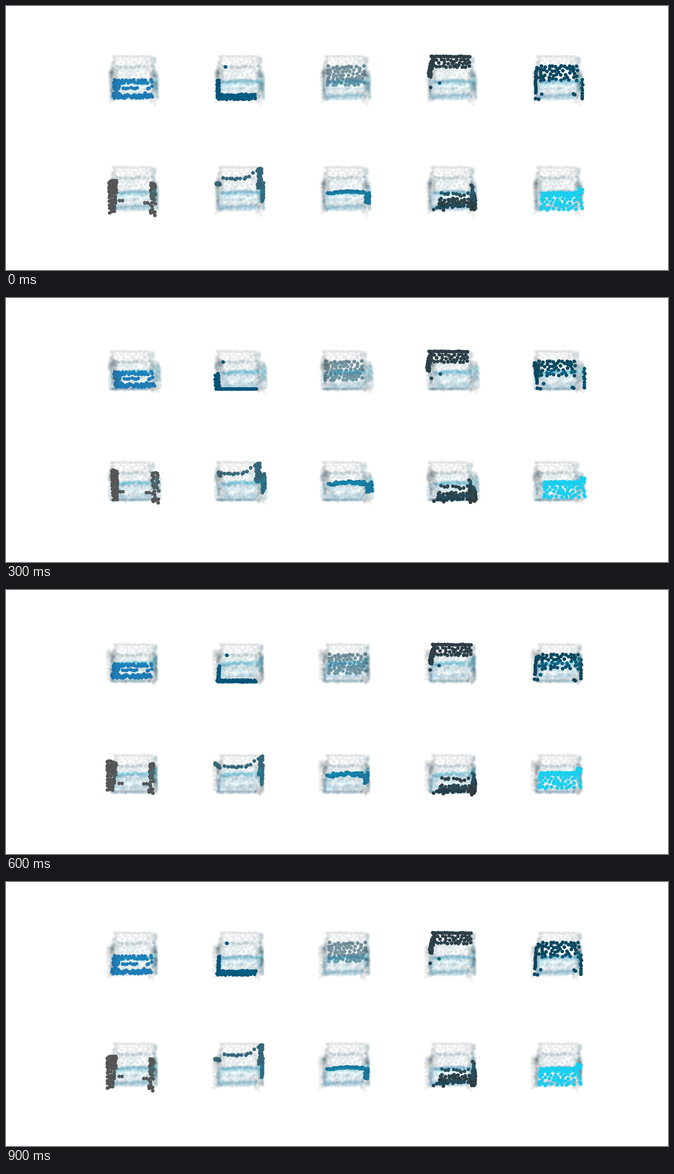
Write a matplotlib script that moves like this. It is 1183 px wide and 473 px high and loops after 1000 ms.

```python
import numpy as np
import matplotlib.pyplot as plt
from matplotlib.animation import FuncAnimation
from matplotlib.colors import to_rgba

W, H = 1183, 473
STEPS = 10
COL_GAP, ROW_GAP = 189.6, 198.7
FAINT = 0.052
BACK = -4.1  # sway of the backrest; positive values lie nearer the viewer

rng = np.random.default_rng(7)


def underside(x, y):
    """Bottom plane, seen edge-on when the camera is low."""
    return (y - 163) / 1.31


def ramp(top, bottom, side=0.0):
    """Depth rule running over a region from top to bottom and left to right."""
    def rule(x, y):
        v = (y - y.min()) / max(np.ptp(y), 1)
        u = (x - x.min()) / max(np.ptp(x), 1)
        return top + (bottom - top) * v + side * (u - 0.5)
    return rule


def with_depth(x, y, depth):
    d = depth(x, y) if callable(depth) else np.full(len(x), float(depth))
    return np.column_stack([x, y, d])


def spread(n, x0, x1, y0, y1, depth, lean=0.0):
    """Evenly scattered points in a box that may lean sideways."""
    lo, size = np.array([x0, y0]), np.array([x1 - x0, y1 - y0])
    pts = [lo + rng.random(2) * size]
    while len(pts) < n:
        cand = lo + rng.random((14, 2)) * size
        gap = np.linalg.norm(cand[:, None] - np.array(pts)[None], axis=2).min(axis=1)
        pts.append(cand[gap.argmax()])
    x, y = np.array(pts).T
    return with_depth(x + lean * (y - y0), y, depth)


def arc(n, start, end, depth, sag=0.0, wobble=0.0):
    """Points along a sagging line."""
    s = np.linspace(0, 1, n)[:, None]
    x, y = (np.array(start) * (1 - s) + np.array(end) * s).T
    x, y = rng.uniform(-wobble, wobble, (2, n)) + [x, y]
    return with_depth(x, y + 4 * sag * (s * (1 - s))[:, 0], depth)


def cushion():
    return [
        spread(27, 192, 262, 132, 139, ramp(0, 1)),
        spread(12, 192, 203, 141, 158, ramp(1, 3.5)),
        arc(7, (211, 146), (236, 147), 2, sag=1, wobble=2),
        arc(5, (259, 142), (248, 157), ramp(1, 3.5), wobble=3),
        spread(36, 191, 262, 159, 165, 4),
    ]


def base():
    return [
        arc(1, (202.5, 109), (202.5, 109), -4.4),
        spread(18, 187.5, 191.5, 133, 160, ramp(-3, -1, 3)),
        spread(54, 188, 256, 158, 167.5, underside),
    ]


def back_lower():
    return [spread(72, 195, 262, 107, 142, BACK)]


def back_top():
    return [
        arc(21, (191, 90.5), (260, 90.5), BACK, wobble=0.7),
        spread(32, 195, 260, 95, 110, BACK),
        spread(22, 191, 196, 93, 127, ramp(BACK, -3), lean=-0.17),
        arc(2, (190, 146), (206, 138), 1.5),
    ]


def back_rear():
    return [
        spread(54, 189, 263, 107, 134, BACK - 0.3),
        arc(13, (188, 118), (188, 155), ramp(-1.5, 2.5), wobble=0.8),
        arc(3, (188, 166), (199, 158), 3.4, sag=5),
        arc(8, (271, 133), (272, 165), 4, wobble=1.2),
        arc(2, (255.5, 157.5), (258, 159), -1.9),
    ]


def arms():
    return [
        spread(32, 184, 198, 113, 137, ramp(3, 3.8, -4)),
        spread(22, 184, 196, 139, 172, ramp(4, 6, -2)),
        arc(2, (203, 150), (208, 150), 1.2),
        spread(26, 258, 267, 118, 172, ramp(3.6, 5.8, 2.5)),
        arc(2, (248, 154), (253, 154), 3),
        arc(1, (266, 176.5), (266, 176.5), 6.3),
    ]


def right_side():
    return [
        spread(32, 261, 267, 92, 128, ramp(BACK, -2, 2), lean=0.03),
        spread(12, 259, 271, 118, 128, ramp(-1.5, 0, 6)),
        spread(18, 267, 270.5, 122, 152, ramp(1.5, 1.6, 2.5)),
        arc(12, (199, 107), (257, 97), BACK, sag=10, wobble=2.4),
        spread(8, 186, 194, 118, 122, ramp(2.6, 2.2, -3)),
    ]


def seat_top():
    return [
        arc(50, (196, 137.5), (262, 135.5), lambda x, y: rng.uniform(0, 3.5, len(x)),
            sag=-2.5, wobble=1.2),
        spread(18, 263, 270.5, 136, 155, ramp(2.8, 4.4, 3)),
    ]


def underframe():
    return [
        spread(44, 204, 263, 146, 162, ramp(-2.8, -1)),
        arc(10, (208, 137.5), (256, 138), ramp(-1, -1), sag=2, wobble=3),
        arc(4, (195.5, 166), (213, 167), 0.5, sag=-4),
        arc(10, (264, 121), (267, 146), ramp(BACK, -3), wobble=1.5),
        spread(24, 262, 270.5, 137, 167, ramp(-2.5, 0, 3)),
    ]


def front():
    return [
        spread(42, 198, 263, 135, 143, ramp(4, 5.4)),
        spread(38, 198, 263, 146, 167, 5.4),
        spread(8, 264, 272, 128, 138, 4.3),
        arc(5, (268, 143), (271, 165), 5, wobble=1.5),
    ]


PARTS = [
    (cushion, "#1f78b4"), (base, "#005377"), (back_lower, "#7f9aa4"),
    (back_top, "#2d3e46"), (back_rear, "#04465f"), (arms, "#555555"),
    (right_side, "#34677a"), (seat_top, "#15749c"), (underframe, "#2f3a40"),
    (front, "#1acfee"),
]

# Paint from the rear part to the nearest one.
clouds = [np.vstack(make()) for make, _ in PARTS]
order = sorted(range(len(PARTS)), key=lambda i: clouds[i][:, 2].mean())
cloud = np.vstack([clouds[i] for i in order])
owner = np.concatenate([np.full(len(clouds[i]), i) for i in order])
colors = np.array([to_rgba(PARTS[i][1]) for i in owner])


def project(step):
    """Sway the camera on a small circle."""
    a = 2 * np.pi * step / STEPS
    x, y, d = cloud.T
    return np.column_stack([x + d * np.sin(a), y + d * (np.cos(a) - 1)])


fig = plt.figure(figsize=((W + 0.01) / 100, (H + 0.01) / 100), dpi=100,
                 facecolor="white")
ax = fig.add_axes([0, 0, 1, 1])
ax.set_xlim(0, W)
ax.set_ylim(H, 0)
ax.axis("off")

panels = []
for k in range(len(PARTS)):
    shift = np.array([COL_GAP * (k % 5), ROW_GAP * (k // 5)])
    rgba = colors.copy()
    rgba[:, 3] = np.where(owner == k, 1.0, FAINT)
    x, y = (project(0) + shift).T
    panels.append((ax.scatter(x, y, s=10, c=rgba, linewidths=1.5), shift))


def draw(step):
    pos = project(step)
    for marks, shift in panels:
        marks.set_offsets(pos + shift)
    return [marks for marks, _ in panels]


anim = FuncAnimation(fig, draw, frames=STEPS, interval=1000 / STEPS, repeat=True,
                     repeat_delay=0, blit=False)
plt.show()
```
